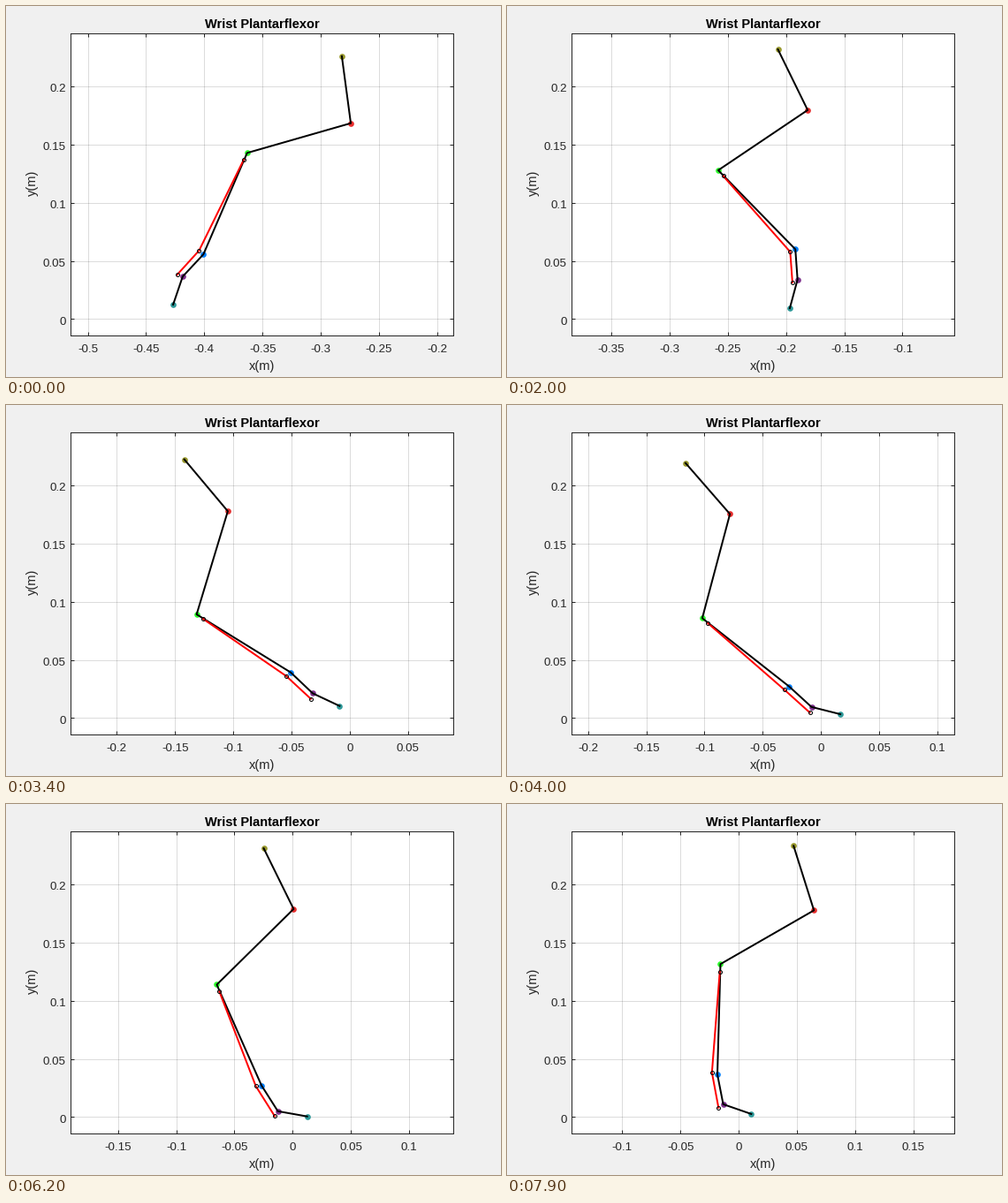
A matplotlib script for the animation above (8000 ms loop, 560x420 px).

```python
import numpy as np
import matplotlib.pyplot as plt
from matplotlib.animation import FuncAnimation
from matplotlib.ticker import FuncFormatter, MultipleLocator, NullFormatter

W, H, DPI = 560, 420, 100
PT = 72 / DPI            # points per pixel
SCALE = 1318             # pixels per metre
GROUND = 354.4           # pixel row of y = 0
LEFT, RIGHT, TOP, BOTTOM = 72.8, 506.3, 31.0, 373.3
FRAMES, HOLD = 80, 4     # the first pose is held for a few extra ticks
LAST = FRAMES - HOLD - 1
INK = "#262626"

plt.rcParams["font.family"] = "Liberation Sans"
plt.rcParams["axes.unicode_minus"] = False


def wave(u, start, end, *amps):
    """Straight drift from start to end plus sine harmonics."""
    swing = sum(a * np.sin(k * np.pi * u) for k, a in enumerate(amps, 1))
    return start + (end - start) * u + swing


def rotate(length, degrees):
    a = np.radians(degrees)
    return length * np.array([np.cos(a), -np.sin(a)])


def pose(step):
    """Joint and muscle points in metres; bones are rigid, headings swing."""
    u = step / LAST
    hip = np.array([wave(u, -361.5, 85.2, 39.6, 6.4, -3.4, -1.5),
                    wave(u, 221.7, 234, 7, 4.4, 4.5, -1)])
    pelvis = wave(u, 82.4, 72.5, -25.4, -3.5, 2.8, 0.6)
    thigh = wave(u, 164, 150.1, -41, -1.7, 10.9, 5.5, 0.8)
    shank = wave(u, 113.3, 91.6, -67.5, -17.9, -4, 0.6, 1.2)
    foot = wave(u, 133, 78.9, -60.8, -4.2, 5.5, 4.5, 3.3)
    toes = wave(u, 108.8, 19.1, -36.6, 16.7, 19.7, 11.7, 5.3)

    crest = hip - rotate(76.5, pelvis)
    knee = hip + rotate(122, thigh)
    ankle = knee + rotate(125, shank)
    ball = ankle + rotate(34.4, foot)
    tip = ball + rotate(33.6, toes)

    def attach(joint, heading, along, out):
        return joint + rotate(along, heading) + rotate(out, heading + 90)

    muscle = [attach(knee, shank, 8.5, 0.5), attach(ankle, shank, -2, 6.2),
              attach(ball, foot, 2.8, 6)]
    joints = [crest, hip, knee, ankle, ball, tip]
    return np.transpose(joints) / SCALE, np.transpose(muscle) / SCALE


fig = plt.figure(figsize=(W / DPI, H / DPI), dpi=DPI, facecolor="#f0f0f0")
ax = fig.add_axes([LEFT / W, 1 - BOTTOM / H, (RIGHT - LEFT) / W,
                   (BOTTOM - TOP) / H], facecolor="white")
ax.set_ylim((GROUND - BOTTOM) / SCALE, (GROUND - TOP) / SCALE)
ax.set_axisbelow(True)
ax.grid(color=INK, alpha=0.16, linewidth=PT)
ax.tick_params(direction="in", top=True, right=True, length=4.3 * PT,
               width=PT, color=INK, labelcolor=INK, labelsize=13.33 * PT)
ax.tick_params(axis="x", pad=10 * PT)
for axis in (ax.xaxis, ax.yaxis):
    axis.set_major_locator(MultipleLocator(0.05))
ax.xaxis.set_major_formatter(FuncFormatter(lambda v, _: f"{round(v, 2) + 0:g}"))
ax.yaxis.set_major_formatter(NullFormatter())
for spine in ax.spines.values():
    spine.set(color=INK, linewidth=PT)


def label(x, y, text, size=14.67, ha="center", **style):
    fig.text(x / W, 1 - y / H, text, ha=ha, size=size * PT, **style)


label(290, 25, "Wrist Plantarflexor", weight="bold", color="black")
label(290, 412, "x(m)", color=INK)
label(30, 200.5, "y(m)", color=INK, rotation=90, va="center")
for i in range(5):
    value = 0.05 * i
    label(68, GROUND - value * SCALE + 6.3, f"{value:g}", 13.33, "right",
          color=INK)

colors = ["#99992e", "#e62e2e", "#2eff2e", "#0080ff", "#80338f", "#2e9999"]
dots = [ax.plot([], [], "o", ms=6.7 * PT, mew=0, color=c)[0] for c in colors]
bones, = ax.plot([], [], color="black", lw=2 * PT)
tendon, = ax.plot([], [], color="red", lw=2 * PT)
pins, = ax.plot([], [], "o", ms=4 * PT, mfc="none", mec="black", mew=PT)


def draw(frame):
    joints, muscle = pose(max(0, frame - HOLD))
    for dot, x, y in zip(dots, *joints):
        dot.set_data([x], [y])
    bones.set_data(*joints)
    tendon.set_data(*muscle)
    pins.set_data(*muscle)
    # the view follows the middle of everything drawn
    xs = np.append(joints[0], muscle[0])
    mid = (xs.min() + xs.max()) / 2
    half = (RIGHT - LEFT) / 2 / SCALE
    ax.set_xlim(mid - half, mid + half)
    return [*dots, bones, tendon, pins]


anim = FuncAnimation(fig, draw, frames=FRAMES, interval=100,
                     repeat=True, repeat_delay=0, blit=False)
plt.show()
```
